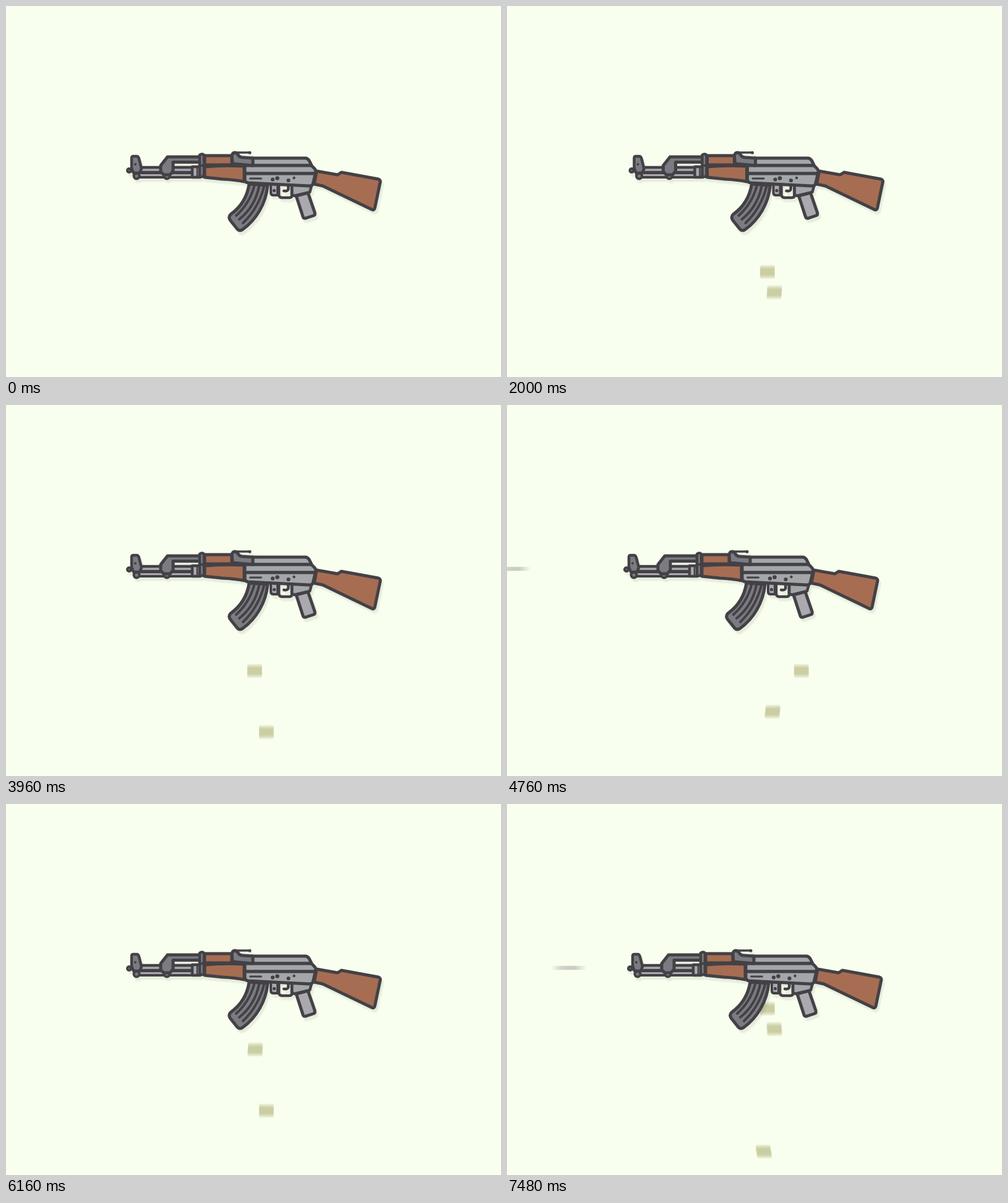
Animation, 800 px wide and 600 px high, one loop 7.52 s. Source, as an HTML page:

```html
<!DOCTYPE html>
<html lang="en">
<head>
<meta charset="utf-8">
<title>Recoil loop</title>
<style>
  html, body { margin: 0; width: 100%; height: 100%; overflow: hidden; background: #f9ffee; }
  svg { display: block; width: 100vw; height: 100vh; }
  .ink { stroke: #434146; stroke-width: 5; stroke-linejoin: round; stroke-linecap: round; }
  .dot { fill: #434146; stroke: none; }
  .line { fill: none; }
  .wood { fill: #a66d52; }
  .dark { fill: #7b7c81; }
  .steel { fill: #a3a7a9; }
  .light { fill: #a9a9ae; }
</style>
</head>
<body>
<svg viewBox="0 0 800 600">
  <defs>
    <filter id="shadow" filterUnits="userSpaceOnUse" x="150" y="200" width="500" height="200" color-interpolation-filters="sRGB">
      <feDropShadow dx="3" dy="5" stdDeviation="0.8" flood-color="#434146" flood-opacity="0.1"/>
    </filter>
    <filter id="smear" filterUnits="userSpaceOnUse" x="150" y="200" width="500" height="200" color-interpolation-filters="sRGB">
      <feGaussianBlur id="blur" stdDeviation="0 0"/>
    </filter>
    <linearGradient id="streak">
      <stop offset="0" stop-color="#77777a" stop-opacity="0"/>
      <stop offset="0.3" stop-color="#77777a" stop-opacity="0.32"/>
      <stop offset="0.65" stop-color="#77777a" stop-opacity="0.38"/>
      <stop offset="1" stop-color="#77777a" stop-opacity="0"/>
    </linearGradient>
  </defs>
  <g id="casings" fill="#a3a365"></g>
  <g id="bullets"></g>
  <g id="gun">
    <g filter="url(#shadow)">
      <g class="ink">
        <!-- barrel -->
        <path class="light" d="M214 261H304V269H214Z" stroke-width="4.5"/>
        <path class="light" d="M212 270H304V277H212Z" stroke-width="4"/>
        <circle class="dark" cx="211" cy="275" r="4.5" stroke-width="4"/>
        <circle class="dark" cx="260" cy="275" r="4.5" stroke-width="4"/>
        <circle class="dark" cx="199" cy="266" r="3" stroke-width="4"/>
        <path class="dark" d="M203 262V246Q203 243 206 243H211Q214 243 215 247L219 263L216 270H206Z" stroke-width="4.5"/>
        <circle class="dot" cx="209" cy="256" r="2"/>
        <path class="dark" d="M250 258L261 244H315V252.500H270V267L265 273H255L250 268Z"/>
        <path class="light" d="M301 260H314V277H301Z" stroke-width="4.500"/>
        <path class="line" d="M309 261V276" stroke-width="2.5"/>
        <!-- handguard -->
        <path class="wood" d="M321 242H365V257H321Z"/>
        <path class="wood" d="M321 260Q350 257 385 259V284Q370 281 350 280L321 277Z"/>
        <path class="dark" d="M313 241Q317 238 320 241V276H313Z" stroke-width="4.500"/>
        <path class="line" d="M313 258H320" stroke-width="4"/>
        <!-- magazine -->
        <path class="dark" d="M393 288L423 290C420 320 404 346 383 361Q378 365 374 361L362 346Q359 341 363 337C380 325 390 307 393 288Z"/>
        <path class="line" d="M401 292Q393 320 372 339M409 292Q402 325 377 345M417 292Q408 327 383 351" stroke-width="4"/>
        <!-- grip and stock -->
        <path class="light" d="M469 307L488 302L499 334Q500 338 497 339L485 343Q481 344 480 341Z"/>
        <path class="steel" d="M462 289L494 290L491 301L466 307L462 305Z" stroke-width="4.500"/>
        <path class="wood" d="M502 267L536 273L542 269L602 280Q605 281 605 284L596 327Q595 331 591 329L512 291L498 288Z"/>
        <!-- trigger -->
        <path class="light" d="M428 288V302Q428 306 432 306H439V289Z" stroke-width="4"/>
        <circle class="dot" cx="433.500" cy="298.500" r="2.600"/>
        <path class="line" d="M441 290V306Q442 310 446 310H458Q462 310 462 306V290" stroke-width="4.500"/>
        <path class="line" d="M456 291Q458 301 449 299" stroke-width="4.500"/>
        <!-- receiver -->
        <path class="steel" d="M398 246H484Q487 246 490 250L494 258H398Z"/>
        <path class="steel" d="M386 258H493Q499 262 501 267L499 271H386Z"/>
        <path class="steel" d="M386 271H500L496 288Q495 291 490 291L391 286Q386 285 386 281Z"/>
        <path class="line" d="M394.500 279H412.500" stroke-width="3"/>
        <circle class="dot" cx="431" cy="280.500" r="3.100"/>
        <circle class="dot" cx="438.500" cy="278.500" r="3.300"/>
        <circle class="dot" cx="456.500" cy="282" r="3.100"/>
        <circle class="dot" cx="465.500" cy="278" r="2.200"/>
        <!-- rear sight -->
        <path class="dark" d="M365 242Q366 237 370 237Q374 238 376 242Q378 245 383 245L399 246V258L366 255Z"/>
        <path class="line" d="M370 237H394" stroke-width="3.600"/>
        <circle class="dot" cx="394" cy="237.300" r="2.500"/>
      </g>
    </g>
  </g>
</svg>
<script>
const STEP = 40, FRAMES = 188, CYCLE = 28, SAMPLES = 12, FALL = 33, LANDING = 9;
const $ = id => document.getElementById(id);
const mod = (n, m) => ((n % m) + m) % m;

// [time in cycle, horizontal offset]
const recoil = [[0, 0], [3.3, 0], [5, 10], [7, -6], [9, 2.5], [11, 0], [15.3, 0],
  [17, 10], [19, 0], [20, -6], [22, 2.5], [23, 2.8], [24, 10], [26, -6], [27.7, 0], [28, 0]];
// [time in cycle, sideways swing, swing duration]
const ejections = [[1, 13, 9], [3, 55, 10], [8, 0, 10], [11, -19, 10], [17, 13, 9], [18, 0, 10]];
// [time in cycle, bullet centre]
const shots = [[6, 100], [19, 100], [26, 57]];

function add(parent, attrs) {
  const node = document.createElementNS("http://www.w3.org/2000/svg", "rect");
  for (const key in attrs) node.setAttribute(key, attrs[key]);
  return parent.appendChild(node);
}

const casings = ejections.map(() => Array.from({ length: SAMPLES }, () =>
  add($("casings"), { width: 24, height: 8, rx: 2.5, opacity: 0.12 })));
const bullets = shots.map(() =>
  add($("bullets"), { width: 58, height: 6.5, y: 261.8, rx: 3, fill: "url(#streak)" }));

function gunX(time) {
  const t = mod(time, CYCLE);
  const i = recoil.findIndex(key => key[0] > t);
  const [t0, x0] = recoil[i - 1], [t1, x1] = recoil[i];
  return x0 + (x1 - x0) * (t - t0) / (t1 - t0);
}

function drawCasing(rects, [birth, swing, duration], frame) {
  const age = mod(frame - birth + 1, CYCLE) - 1;
  const visible = age <= LANDING && frame - age - 1 >= 0;
  rects.forEach((rect, i) => {
    rect.style.display = visible ? "" : "none";
    const k = Math.min(LANDING, age + (i + 0.5) / SAMPLES / 2 - 0.25);
    const phase = Math.max(0, Math.min(1, (k + 1) / duration));
    rect.setAttribute("x", 408.8 + swing * Math.sin(Math.PI * phase));
    rect.setAttribute("y", 294 + FALL * k);
  });
}

function drawBullet(rect, [time, center], frame) {
  const x = center - 90 * (mod(frame - time + 2, CYCLE) - 2);
  rect.style.display = x > -30 && x < 235 && frame > 2 ? "" : "none";
  rect.setAttribute("x", x - 29);
}

function draw(frame) {
  const travel = Math.abs(gunX(frame + 0.25) - gunX(frame - 0.25));
  $("gun").setAttribute("transform", `translate(${gunX(frame)} 0)`);
  $("blur").setAttribute("stdDeviation", `${travel * 0.29} 0`);
  if (travel > 0.05) $("gun").setAttribute("filter", "url(#smear)");
  else $("gun").removeAttribute("filter");
  casings.forEach((rects, i) => drawCasing(rects, ejections[i], frame));
  bullets.forEach((rect, i) => drawBullet(rect, shots[i], frame));
}

let start;
function tick(now) {
  start ??= now;
  draw(Math.floor((now - start) / STEP + 0.001) % FRAMES);
  requestAnimationFrame(tick);
}
draw(0);
requestAnimationFrame(tick);
</script>
</body>
</html>
```
